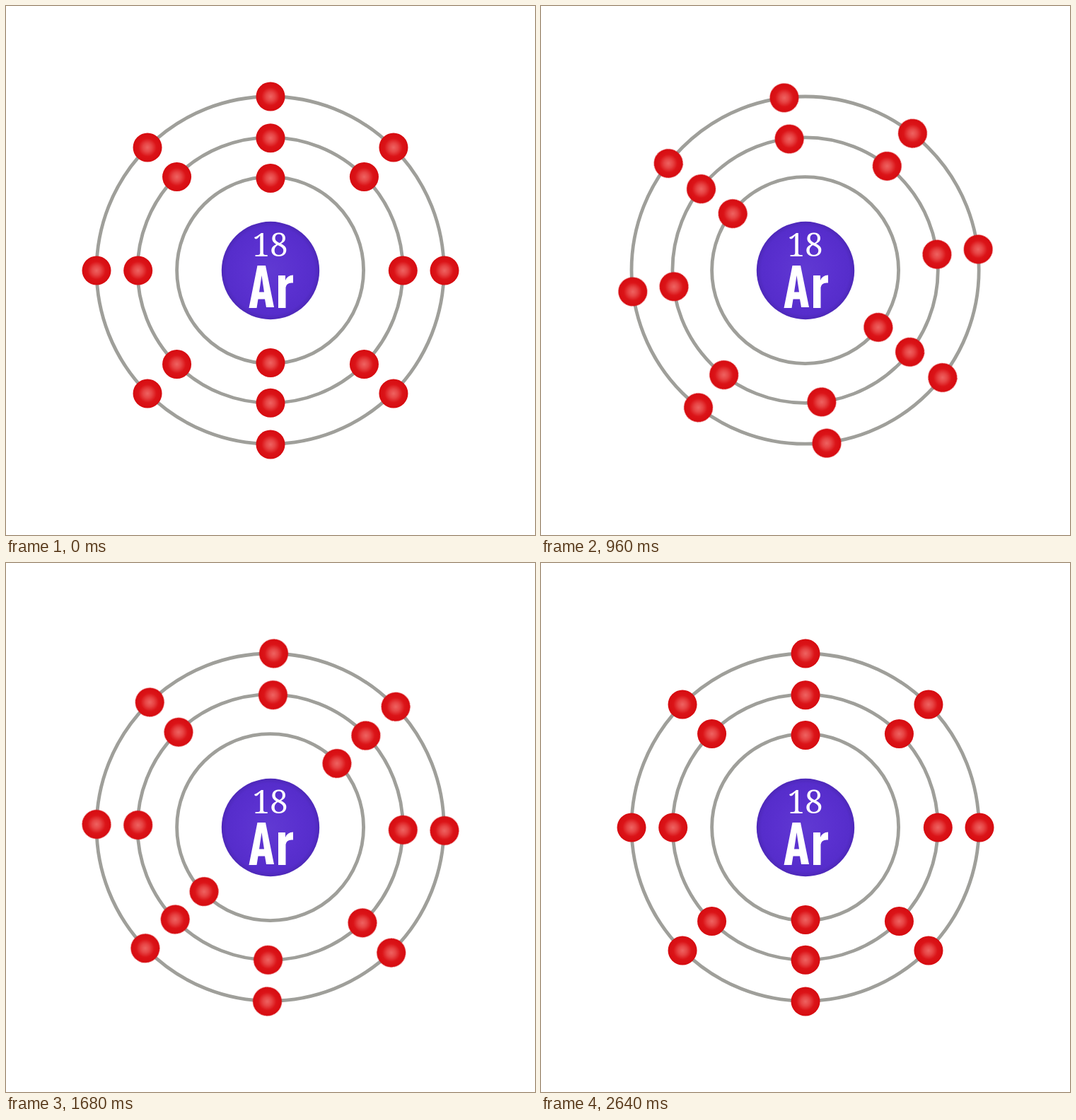
An HTML page for the animation above (2670 ms loop, 748x748 px).

```html
<!DOCTYPE html>
<html lang="en">
<head>
<meta charset="utf-8">
<title>Electron shells</title>
<style>
  html, body { margin: 0; width: 100%; height: 100%; overflow: hidden; background: #fff; }
  svg { display: block; width: 100vw; height: 100vh; }
  #electrons { transform-origin: 374px 374px; }
  .number { font: 45px "Noto Serif", "Liberation Serif", serif; text-anchor: middle; }
</style>
</head>
<body>
<svg viewBox="0 0 748 748" role="img" aria-label="Ar, 18: electron shells 2, 8, 8">
  <defs>
    <radialGradient id="red">
      <stop offset="0" stop-color="#ee6361"/>
      <stop offset=".3" stop-color="#e74545"/>
      <stop offset=".62" stop-color="#db1418"/>
      <stop offset="1" stop-color="#d60b10"/>
    </radialGradient>
    <radialGradient id="violet">
      <stop offset="0" stop-color="#6039d2"/>
      <stop offset=".6" stop-color="#5a30cf"/>
      <stop offset=".9" stop-color="#562dcb"/>
      <stop offset="1" stop-color="#4d28b8"/>
    </radialGradient>
  </defs>
  <g id="rings" fill="none" stroke="#9f9f9a" stroke-width="4.8"></g>
  <g id="electrons" fill="url(#red)"></g>
  <circle cx="374" cy="374" r="69.2" fill="url(#violet)"/>
  <g fill="#fff">
    <text class="number" x="373.3" y="354">18</text>
    <path aria-label="Ar" fill-rule="evenodd" d="M355.5 367H367L379 426H368L366 414.5H356.5L354.5 427H343.5Z
      M361.5 381L358 404.5H365Z
      M385 381H395V388Q398 380.5 406 380.5V391.5Q396.5 390.5 395.5 398V427H385Z"/>
  </g>
</svg>
<script>
  const STEP = 30, LOOP = 2670;
  const FIRST = 45, SECOND = 43; // steps in each half turn
  const shells = [
    { ring: 132, orbit: 130.5, count: 2 },
    { ring: 187.7, orbit: 187.3, count: 8 },
    { ring: 245.6, orbit: 246, count: 8 }
  ];

  const rings = document.getElementById("rings");
  const electrons = document.getElementById("electrons");

  function addCircle(parent, cx, cy, r) {
    const circle = document.createElementNS("http://www.w3.org/2000/svg", "circle");
    for (const [name, value] of Object.entries({ cx, cy, r })) circle.setAttribute(name, value);
    parent.append(circle);
  }

  for (const { ring, orbit, count } of shells) {
    addCircle(rings, 373.6, 373.6, ring);
    for (let i = 0; i < count; i++) {
      const angle = i / count * 2 * Math.PI;
      addCircle(electrons, 374 + orbit * Math.sin(angle), 374 - orbit * Math.cos(angle), 20.5);
    }
  }

  electrons.animate([
    { transform: "rotate(0deg)", offset: 0, easing: `steps(${FIRST})` },
    { transform: "rotate(180deg)", offset: FIRST * STEP / LOOP, easing: `steps(${SECOND})` },
    { transform: "rotate(360deg)", offset: (FIRST + SECOND) * STEP / LOOP },
    { transform: "rotate(360deg)", offset: 1 }
  ], { duration: LOOP, iterations: Infinity, delay: -1 }); // 1 ms lead keeps step edges clear of rounding
</script>
</body>
</html>
```
